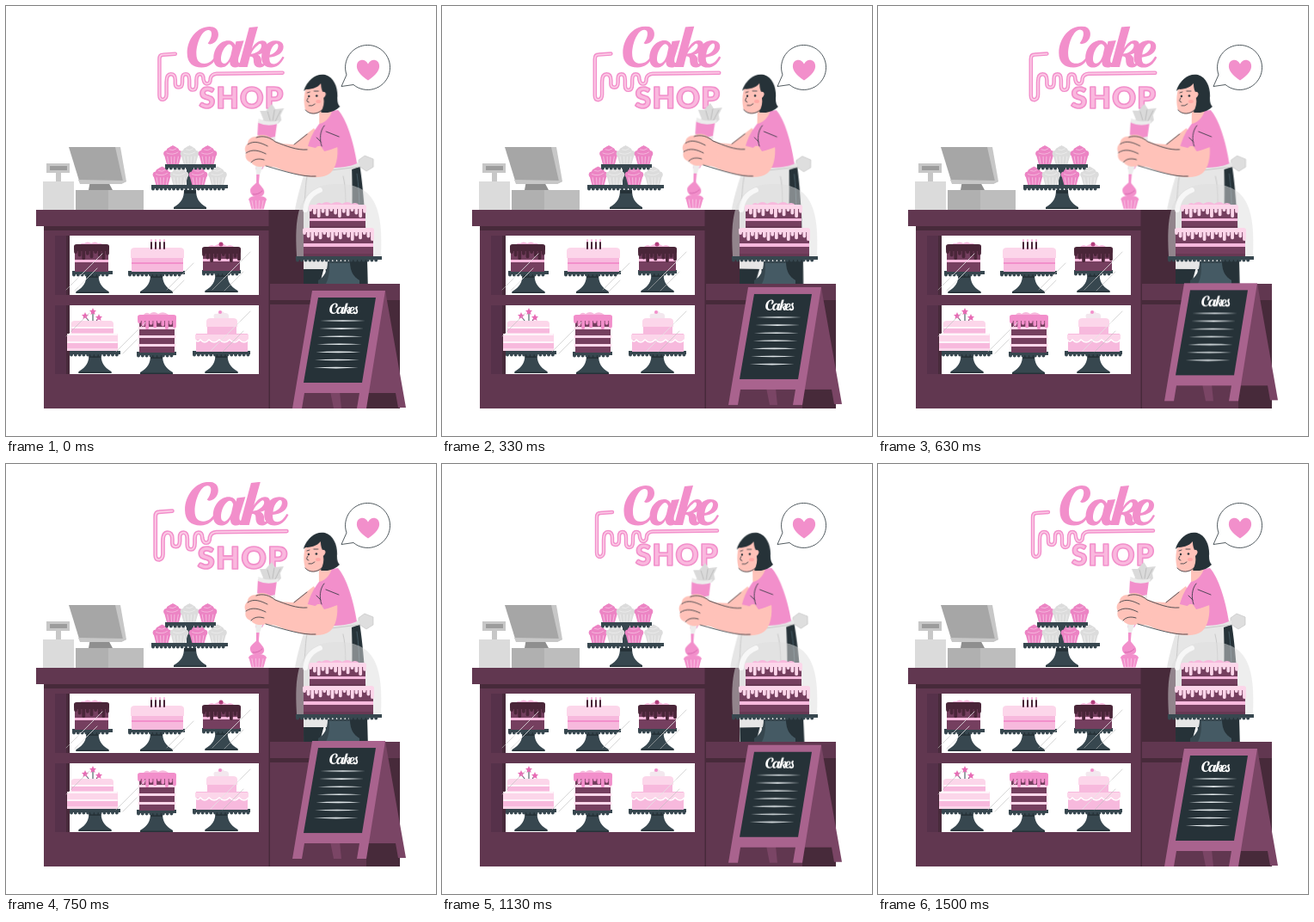
These frames come from a looping animation (500 px wide and 500 px high, 1540 ms). An HTML page:

```html
<!DOCTYPE html>
<html lang="en">
<head>
<meta charset="utf-8">
<title>Cake Shop</title>
<style>
  html, body { margin: 0; height: 100%; overflow: hidden; background: #fff; }
  svg { display: block; width: 100vw; height: 100vh; }
  .beat, .sway, .float { animation: 1540ms linear -34ms infinite; }
  .beat { animation-name: beat; transform-origin: 249.5px 71px; }
  .sway { animation-name: sway; transform-origin: 375px 290px; }
  .float { animation-name: float; animation-timing-function: ease-in-out; }
  @keyframes beat {
    0%, 30%, 40%, 60%, 100% { transform: scale(1); }
    10%, 50% { transform: scale(1.1); }
  }
  @keyframes sway {
    0%, 100% { transform: rotate(0deg); }
    25% { transform: rotate(1deg); }
    75% { transform: rotate(-1deg); }
  }
  @keyframes float {
    0%, 100% { transform: translateY(0); }
    50% { transform: translateY(-9px); }
  }
  .ln { fill: none; stroke-linecap: round; stroke-linejoin: round; }
  .ink { stroke: #263238; stroke-width: .8; }
  .wood { fill: #613750; }
  .dark { fill: #472a3a; }
  .choc { fill: #753f5f; }
  .pink { fill: #f28fcb; }
  .rose { fill: #f7b9dd; }
  .pale { fill: #fcd6ea; }
  .skin { fill: #ffc2b9; }
  .teal { fill: #37474f; }
  .shop { font: 900 33px Lato, "Open Sans", sans-serif; letter-spacing: 1.3px;
    fill: #fab8de; stroke: #f28fcb; stroke-width: 1.6; stroke-linejoin: round; }
</style>
</head>
<body>
<svg viewBox="0 0 500 500" role="img" aria-label="Cake Shop">
<defs>
  <g id="cake" fill="currentColor" fill-rule="evenodd">
    <path d="M235 44C240 38 241 29 236 29C229 28 222 43 222 56C222 64 226 67 231 67C237 67 241 63 244 57L246 58C242 67 236 71.500 228 71.500C218 71.500 211.500 66 211.500 55C211.500 39 223 25 237 25C243 25 247 28 247 34C247 40 242 45 237 45Z"/>
    <path d="M266 46L267 42L276 41L270 60C269 65 270 67 272 66C274 65 275 62 276 59L278 60C275 68 271 71.500 266 71.500C262 71.500 260 69 260 65C257 70 254 71.500 250 71.500C245 71.500 241.500 68 241.500 61C241.500 50 249 41 258 41C262 41 265 43 266 46ZM263 49C262 45 259 44 257 46C252 50 250 57 250 62C250 66 252 67 254 67C258 66 260 61 261 58Z"/>
    <path d="M282 26L292 25L285 50C288 45 292 41 297 41C301 41 303 44 302 48C301 53 297 56 292 57C296 59 296 62 296 65C296 67 297 68 298 67C300 66 301 63 302 60L304 61C302 67 299 71.500 294 71.500C288 71.500 287 67 287 63C287 60 286 59 283 59L280 71H270ZM284 56C290 56 296 51 296 47C296 44 294 44 292 46C288 49 286 52 284 56Z"/>
    <path d="M322 60C318 68 313 71.500 307 71.500C300 71.500 296 67 296 60C296 49 303 41 312 41C318 41 321 44 321 48C321 55 314 59 305 60C305 65 306 67.500 310 67.500C314 67.500 317 64 320 59ZM305.500 57C311 56 315 51 315 47C315 45 314 44 312.500 44.500C309 46 306 51 305.500 57Z"/>
  </g>
  <path id="icing" class="ln" d="M198 56L184 57Q180 57 180 62V103Q180 108 184 108Q188 107 188 102V88Q188 79 193 79Q198 79 198 86V90Q198 94 202 94Q206 94 206 88V84Q206 79 210 79Q214 79 214 86V92Q214 97 218 97Q222 97 222 90V86Q222 79 226 79Q230 79 230 85Q231 90 234 90Q238 90 238 84Q239 79 245 78.500L320 77.500"/>
  <g id="wrap">
    <path fill="currentColor" d="M-10-11H10L7 0H-7Z"/>
    <path class="ln" stroke="#fff" stroke-opacity=".45" d="M-6.500-10L-5-1M-2-10L-1.500-1M2-10L1.500-1M6.500-10L5-1"/>
  </g>
  <g id="cup">
    <use href="#wrap"/>
    <path fill="currentColor" d="M-10-10C-12-13-10-16-7.500-16C-7-19-3-20 0-22C3-20 7-19 7.500-16C10-16 12-13 10-10Q7.500-8 5-10Q2.500-8 0-10Q-2.500-8-5-10Q-7.500-8-10-10Z"/>
    <path class="ln" stroke="#fff" stroke-opacity=".4" d="M-7-13Q0-10 6-14M-4-17Q0-15 4-18"/>
  </g>
  <g id="foot">
    <path class="teal" d="M-7 0H7C7 9 10 15 19 20V22H-19V20C-10 15-7 9-7 0Z"/>
    <path fill="#263238" d="M-7 0H7V4H-7ZM-19 20.500H19V22H-19Z"/>
  </g>
  <path id="heart" d="M0 13C-9 7-14 1-13-5C-12-12-3-13 0-6C3-13 12-12 13-5C14 1 9 7 0 13Z"/>
  <path id="star" d="M0-4L1.200-1.200L4-1L2 1L2.500 4L0 2.500L-2.500 4L-2 1L-4-1L-1.200-1.200Z"/>
</defs>

<rect width="500" height="500" fill="#fff"/>

<g class="beat">
  <use href="#cake" color="#f28fcb"/>
  <use href="#icing" stroke="#f28fcb" stroke-width="4.400"/>
  <use href="#icing" stroke="#fccbe6" stroke-width="1.700"/>
  <text class="shop" x="225" y="117.500">SHOP</text>
</g>

<path d="M396 80A26 26 0 1 1 404 91.500L390 93.500Z" fill="#fff" class="ink" stroke-linejoin="round"/>
<use href="#heart" class="pink" x="421" y="73.500"/>

<!-- baker -->
<g class="sway">
  <path fill="#263238" d="M398 186L411 184C416 214 420 270 421 330H374L371 300L363 330H346V290Z"/>
  <path class="ln" stroke="#455a64" d="M408 195C412 220 411 255 412 290"/>
  <path fill="#dedede" stroke="#c4c4c4" stroke-width=".7" d="M410 179L417 174L427 178L427 187L419 192L410 186Z"/>
  <path fill="#e6e6e6" d="M347 194C342 210 338 225 336 237V306H398C403 262 403 220 402 190L411 187V182L378 187Z"/>
  <path class="ln" stroke="#c9c9c9" d="M378 191L410 187M350 198C347 212 349 228 344 240M392 198C396 214 394 230 396 250"/>
  <path class="skin" d="M358 142L334 161L318 160V172L350 178L372 170Z"/>
  <path class="ln ink" d="M350 149L335 161"/>
  <path class="skin" d="M364 114H379V128C376 136 370 138 364 137Z"/>
  <path class="pink" d="M364 137C370 136 376 131 379 122L386 121C396 132 404 158 408 183C400 187 388 188 378 188L380 170L351 163C354 152 358 145 364 137Z"/>
  <path fill="#263238" d="M349 99C350 84 361 78 371 80C382 83 386 97 385 107C385 112 386 115 388 117C384 121 379 123 374 124L367 124L352 112Z"/>
  <path class="skin" d="M348 97C345 108 347 118 348 121C353 127 362 126 366 123C369 118 370 112 369 107C373 104 372 99 368 100C366 96 366 92 366 90C361 96 354 97 348 97Z"/>
  <path class="ln ink" d="M348 121C353 127 362 126 367 121M350 101L353 100M358 99L363 99M351 107Q349 110 350 111L352 112M352 116Q356 117 359 114"/>
  <path fill="#263238" d="M346 99C350 94 361 95 367 87L355 85C349 90 347 95 346 99Z"/>
  <circle cx="352" cy="105" r="1.200" fill="#263238"/><circle cx="361" cy="104.500" r="1.300" fill="#263238"/>
  <ellipse cx="363" cy="111" rx="3" ry="2" fill="#ff9d9d" opacity=".7"/>

  <use href="#wrap" x="292.500" y="236.500" color="#f28fcb"/>
  <path class="pink" d="M282 226C282 222 287 221 292 221C298 221 303 222 303 226Z"/>
  <path class="pink" d="M291.500 205C288 209 283 211 284 216C285 221 289 222 293 222C298 222 301 219 300 215C299 211 295 209 293.500 205Z"/>
  <path class="ln" stroke="#d667ad" d="M287 219Q293 220 298 215"/>
  <path class="pink" d="M291 192H295L293.500 210H291Z"/>
  <path fill="#dadada" d="M299 132L295 122L302 122L309 114L313 120L323 119L319 127L320 133L316 137H295Z"/>
  <path class="ln" stroke="#bcbcbc" d="M304 123L307 133M312 121L310 133M319 122L313 134"/>
  <path class="pink" d="M293 134Q304 140 315 136L311 165L298 190H290Z"/>
  <path fill="#ececec" d="M293.500 131Q305 137 317 133L316 137Q304 141 293 136ZM292 150Q303 155 313 152L312 160H291ZM289 178L301 180L295 196H291Z"/>
  <path class="skin" d="M384 156C387 170 385 185 379 192C373 201 355 200 342 197C330 194 318 190 310 186L312 157C328 163 343 169 356 168L366 160Z"/>
  <path class="skin" d="M313 158C306 150 297 148 291 152C285 152 281 155 281 160C277 163 277 168 279 171C277 176 280 181 285 182C288 187 296 188 302 186L316 188C320 178 319 166 313 158Z"/>
  <path class="ln ink" d="M291 153C299 150 307 153 313 158C326 163 338 168 350 167M281 161C288 156 296 159 304 163M279 171C286 166 294 168 302 172M285 182C288 178 294 177 300 179M302 186C326 193 345 199 360 198"/>
  <path class="pink" d="M364 140C377 138 387 149 388 163C382 165 375 168 370 169L366 163L351 163Z"/>
  <path class="ln ink" d="M370 139C365 145 364 155 367 163M372 146L387 152M366 158L361 153"/>
</g>

<!-- counter -->
<rect class="dark" x="306" y="237" width="40" height="87"/>
<path class="wood" d="M306 323H458V468H306ZM35 237H307V256H35ZM44 256H307V468H44Z"/>
<path class="dark" d="M44 256H306V261H44ZM306 342H458V347H306ZM305.500 237H307V468H305.500ZM419 342H458V468H419Z"/>
<rect x="57" y="267" width="237" height="161" fill="#fff"/>
<rect class="dark" x="57" y="267" width="17" height="161"/>
<path fill="#56314a" d="M57 267H70V428H57Z"/>
<rect class="wood" x="56" y="336" width="239" height="12"/>

<!-- register -->
<path fill="#dbdbdb" d="M43 204H79V237H43Z"/>
<path fill="#c7c7c7" d="M58 193H64V204H58ZM47 183H74V194H47Z"/>
<path fill="#9c9c9c" d="M51 186H71V191H51Z"/>
<path fill="#8f8f8f" d="M98 203H118L124 214H96Z"/>
<path fill="#c7c7c7" d="M126 164H133L140 204L134 207Z"/>
<path fill="#a6a6a6" d="M73 164H127L136 204L85 203Z"/>
<path fill="#c7c7c7" d="M84 202L136 203L140 204L134 207H86Z"/>
<path fill="#b0b0b0" d="M81 214H160V237H81Z"/>
<path fill="#bdbdbd" d="M119 214H160V237H119Z"/>

<!-- cupcake stand -->
<path class="teal" d="M210 188H218V210H210Z"/>
<use href="#foot" x="214" y="214"/>
<g id="cups"></g>
<g id="plates"></g>

<!-- upper shelf -->
<path class="choc" d="M80 280H119V309H80ZM229 282H272V308H229Z"/>
<path class="rose" d="M80 295H119V298H80ZM229 294H272V297H229ZM146 284H206V309H146Z"/>
<path class="rose" d="M86 278Q87 275 91 276Q95 273 99 276Q104 273 107 276Q112 275 112 278ZM234 281Q238 276 242 279Q250 274 257 279Q262 276 266 281Z"/>
<path class="pale" d="M145 285Q145 281 150 281H202Q207 281 207 285V293H145Z"/>
<path class="pink" d="M146 298H206V300H146Z"/>
<path class="ln" stroke="#4a2639" stroke-width="2" d="M169 275V282M174 275V282M179 275V282M184 275V282"/>
<path class="ln" stroke="#f28fcb" stroke-width="1.500" d="M169 272V273M174 272V273M179 272V273M184 272V273"/>
<circle cx="250" cy="277" r="2.500" fill="#b23f7d"/>

<!-- lower shelf -->
<path class="ln" stroke="#37474f" d="M92 361L97 367M101 356V367M107 363L104 368"/>
<g fill="#e86bb5"><use href="#star" x="92" y="360"/><use href="#star" x="101" y="355"/><use href="#star" x="108" y="362"/></g>
<path class="pale" d="M76 369Q76 366 80 366H121Q125 366 125 370V381H130V401H71V381H76Z"/>
<path class="rose" d="M76 375H125V380H76ZM71 392H130V398H71Z"/>
<path class="ln" stroke="#fff" stroke-width="1.500" d="M72 382H129M77 374H124M72 391H129"/>
<path class="choc" d="M155 362H196V403H155Z"/>
<path class="pale" d="M154 373H197V376H154ZM154 383H197V386H154ZM154 393H197V396H154Z"/>
<path class="rose" d="M160 359Q163 355 167 358Q172 354 177 358Q183 354 189 359Z"/>
<path class="rose" d="M234 367H268V382H234ZM221 381H281V402H221Z"/>
<path class="pale" d="M233 367Q233 363 238 363H264Q269 363 269 367V373H233ZM220 382H282V388Q277 394 271 388Q266 394 260 388Q254 394 248 388Q242 394 236 388Q231 394 226 388L220 388Z"/>
<path class="ln" stroke="#fff" stroke-width="1.500" d="M220 388Q223 392 226 388Q231 394 236 388Q242 394 248 388Q254 394 260 388Q266 394 271 388Q277 394 282 388"/>
<path fill="#f3e7ee" d="M242 363Q240 357 246 358Q249 351 254 357Q260 356 259 363Z"/>
<circle cx="249" cy="356" r="2" class="pink"/>

<!-- domed cake -->
<path fill="#dedede" fill-opacity=".5" d="M338 291C335 240 340 207 386 207C432 207 438 240 436 291Z"/>
<path class="ln" stroke="#fff" stroke-opacity=".7" stroke-width="6" d="M348 237C349 226 355 218 365 214"/>
<path class="choc" d="M353 234H418V260H353ZM346 261H427V291H346Z"/>
<path class="rose" d="M353 247H418V250H353ZM346 276H427V280H346Z"/>
<path class="dark" opacity=".3" d="M353 256H418V260H353ZM346 288H427V291H346Z"/>
<path class="rose" d="M360 232Q363 227 367 230Q373 226 378 230Q385 226 391 230Q397 226 402 230Q408 227 411 232Z"/>
<path class="teal" d="M374 297H400C400 308 404 315 411 319V323H363V319C370 315 374 308 374 297Z"/>
<path fill="#455a64" d="M376 299H400C400 308 404 315 411 319V323H372C376 315 376 308 376 299Z"/>

<g id="drips" class="ln" stroke-width="3.800"></g>

<!-- glass glints -->
<path class="ln" stroke="#bdbdbd" stroke-opacity=".75" stroke-width=".8" d="M70 330L112 288M80 331L106 305M187 330L218 299M193 333L207 319M240 330L284 286M254 331L276 309M70 384L97 357M128 402L162 368M136 404L152 388M238 401L284 355M252 402L276 378"/>
<path class="ln" stroke="#fff" stroke-opacity=".6" stroke-width=".8" d="M83 317L112 288M84 327L106 305M253 317L273 297M153 377L162 368M238 401L272 367"/>

<!-- menu board -->
<g class="float">
  <path fill="#7a4565" d="M438 331H441L465 467H456L453 450H415L420 400ZM377 448H388L390 468H381Z"/>
  <path fill="#a9638e" d="M356 331H441L419 468H408L411 450H347L344 468H333Z"/>
  <path fill="#263238" d="M363 339H430L414 438H346Z"/>
  <use href="#cake" color="#fff" transform="translate(319.500 338.800) scale(.268)"/>
  <path class="ln" stroke="#fff" stroke-width="1.900" d="M408 350C405 352 410 354 408 356.500Q406 358 404.500 356.500"/>
  <g id="rows" fill="#e6ecef"></g>
</g>
</svg>
<script>
  const put = (id, list) => document.getElementById(id).innerHTML = list.join('');

  const cups = (xs, y) => xs.map((x, i) =>
    `<use href="#cup" x="${x}" y="${y}" color="${i % 2 ? '#dcdcdc' : '#ec84c4'}"/>`);
  put('cups', [...cups([194, 213.5, 234.5], 184), ...cups([181.5, 201.5, 223.5, 246], 208.5)]);

  // Plate with a scalloped rim, optionally on a foot.
  const plate = ([x, y, w, foot]) =>
    (foot ? `<use href="#foot" x="${x + w / 2}" y="${y + 4}"/>` : '') +
    `<path class="teal" d="M${x} ${y}h${w}v4h${-w}z"/>` +
    `<path class="ln" stroke="#37474f" stroke-width="4" stroke-dasharray="0 4.800" d="M${x + 2} ${y + 4.5}h${w - 4}"/>`;
  put('plates', [
    [185, 184, 59], [169, 208, 89], [337, 291, 100],
    [77, 308, 47, 1], [142, 308, 66, 1], [228, 307, 45, 1],
    [74, 401, 59, 1], [152, 402, 46, 1], [217, 401, 67, 1]
  ].map(plate));

  // Glaze: a rounded band with runs of uneven length.
  const glaze = ([x, y, w, h, color]) => {
    const n = Math.round(w / 5), step = (w - 4) / n;
    let d = '';
    for (let i = 0; i <= n; i++) d += `M${x + 2 + i * step} ${y + 3}v${h + i * 7 % 5 * 1.8 - 2}`;
    return `<rect x="${x}" y="${y}" width="${w}" height="${h}" rx="3" fill="${color}"/><path stroke="${color}" d="${d}"/>`;
  };
  put('drips', [
    [79, 277, 41, 8, '#4a2639'], [228, 280, 45, 8, '#4a2639'], [153, 359, 45, 7, '#f28fcb'],
    [352, 231, 67, 5, '#fcd6ea'], [345, 258, 83, 5, '#fcd6ea']
  ].map(glaze));

  put('rows', Array.from({ length: 7 }, (_, i) =>
    `<path d="M${365.5 - i * 1.3} ${366 + i * 9.1}q26 -1.600 52 0q-26 1.600 -52 0z"/>`));
</script>
</body>
</html>
```
